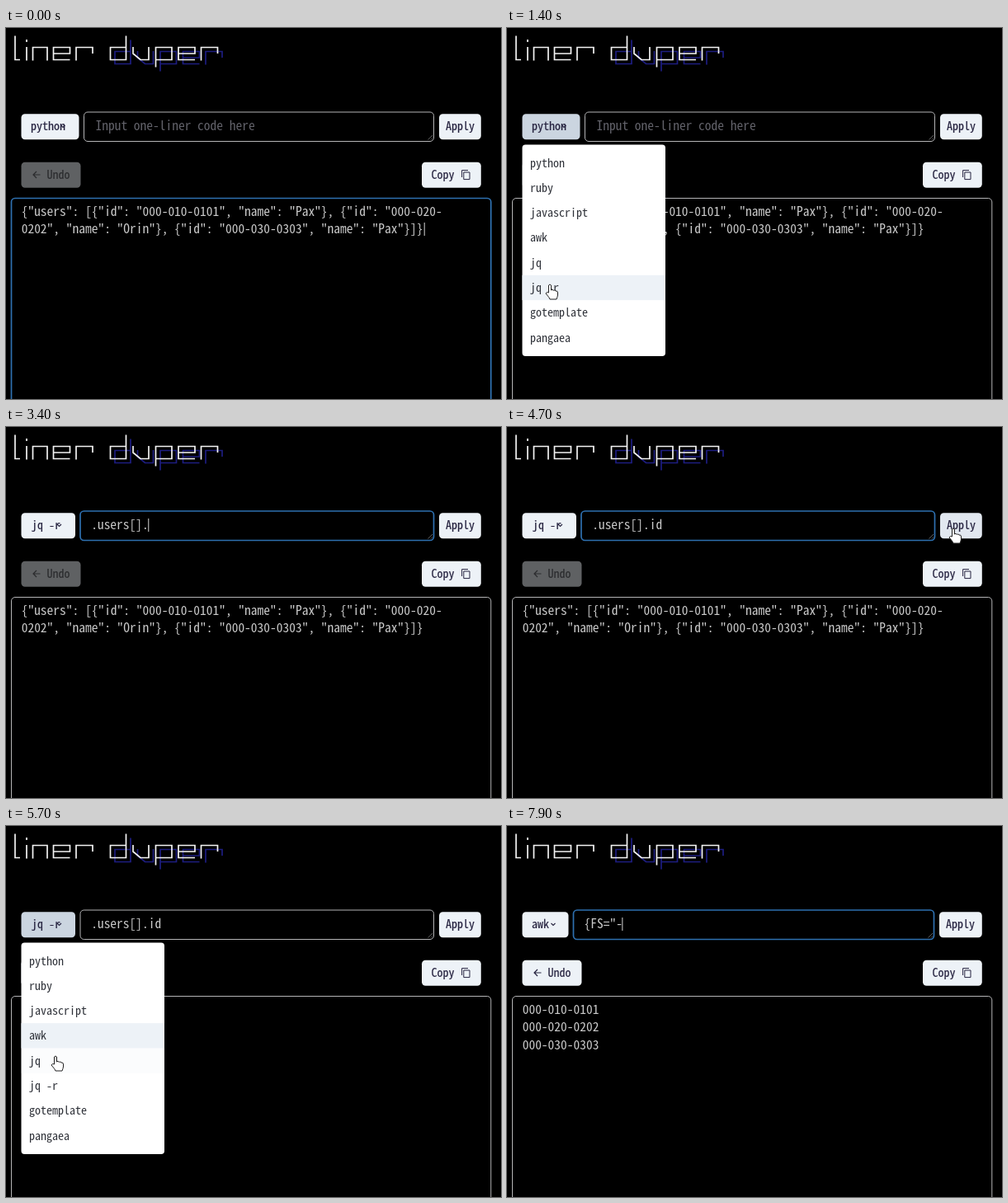
An HTML page that plays this animation: 600 px wide and 450 px high, repeating every 8000 ms.

```html
<!DOCTYPE html>
<html lang="en">
<head>
<meta charset="utf-8">
<title>liner duper</title>
<style>
  html, body { margin: 0; width: 100%; height: 100%; overflow: hidden; background: #000; }
  svg { display: block; width: 600px; height: 450px; }
  text { font-family: "Noto Sans Mono CJK JP", "Noto Sans Mono", "DejaVu Sans Mono", monospace; white-space: pre; }
  .body { fill: #cacaca; }
  .hint { fill: #62626a; }
  .item { fill: #30333a; }
  .label { fill: #25223f; stroke: #25223f; stroke-width: .15; }
  .label.off { fill: #2b2c2e; stroke: #2b2c2e; }
  .line { fill: none; stroke-linejoin: miter; }
</style>
</head>
<body>
<svg viewBox="0 0 600 450">
  <rect width="600" height="450"/>
  <g id="title" class="line" stroke-width="1.7"></g>
  <g id="scene"></g>
</svg>
<script>
const LOOP = 8000, STEP = 100;
const PITCH = 7.73, LABEL_PITCH = 7;
const MENU = { x: 18.5, y: 141.5, w: 173.5, h: 256.5, first: 148.3, row: 30.3 };
const ITEMS = ["python", "ruby", "javascript", "awk", "jq", "jq -r", "gotemplate", "pangaea"];
const IDS = ["000-010-0101", "000-020-0202", "000-030-0303"];
const SOURCE = [
  `{"users": [{"id": "${IDS[0]}", "name": "Pax"}, {"id": "${IDS[1].slice(0, 8)}`,
  `${IDS[1].slice(8)}", "name": "Orin"}, {"id": "${IDS[2]}", "name": "Pax"}]}`
];
const HINT = "Input one-liner code here";
const QUERY = ".users[].id";
const SCRIPT = '{FS="-';

// Layout of the top row for each selected language
const LAYOUTS = {
  "python": { button: 70, text: 30, chevron: 69, input: 94.5, start: 108.5, end: 518.5, apply: 525 },
  "jq -r": { button: 65.5, text: 31, chevron: 64.5, input: 90, start: 103.2, end: 518.5, apply: 525 },
  "awk": { button: 56, text: 30, chevron: 56, input: 80.5, start: 93.5, end: 517.5, apply: 524 }
};

// Times at which each further character appears
const QUERY_KEYS = [2100, 2200, 2300, 2400, 2500, 2700, 2900, 3100, 3400, 4100, 4200];
const SCRIPT_KEYS = [7000, 7200, 7300, 7400, 7700, 7800];

const POINTER = [
  [0, 300, 330], [100, 300, 330], [500, 43, 118], [900, 43, 118],
  [1300, 52, 312], [1500, 52, 312], [1700, 162, 124], [4200, 162, 124],
  [4600, 541, 124], [4900, 541, 124], [5300, 43, 118], [5450, 43, 118],
  [5700, 60, 280], [5800, 60, 280], [5900, 60, 256], [6100, 60, 256],
  [6300, 210, 122], [8000, 210, 122]
];
const HAND = "M-1.5 9V0Q0-2 1.5 0V6Q3 4.5 4.3 6.3Q6 5.3 7 7Q9.5 6.5 9.5 9V12" +
  "Q9 14.5 8 17H0Q-1 14.5-2.5 13L-5 10Q-4 7.5-1.5 9Z";
const ARROW = "M0 0V14L3.5 11L6 16L8 15L5.5 10.2H10Z";

const between = (t, a, b) => t >= a && t < b;
const clamp = v => Math.max(0, Math.min(1, v));
const mix = (a, b, p) => a + (b - a) * p;
const inside = (p, x, y, w, h) => p.x >= x && p.x <= x + w && p.y >= y && p.y <= y + h;

const measure = document.createElement("canvas").getContext("2d");
measure.font = '100px "Noto Sans Mono CJK JP", "Noto Sans Mono", "DejaVu Sans Mono", monospace';
const advance = measure.measureText("0").width / 100;

const text = (x, y, value, kind) => {
  const pitch = /label|item/.test(kind) ? LABEL_PITCH : PITCH;
  return `<text x="${x}" y="${y}" class="${kind}" font-size="${pitch / advance}">${value}</text>`;
};
const box = (x, y, w, h, fill, r = 4.5) =>
  `<rect x="${x}" y="${y}" width="${w}" height="${h}" rx="${r}" fill="${fill}"/>`;
const line = (d, color, width) =>
  `<path class="line" d="${d}" stroke="${color}" stroke-width="${width}"/>`;
const caret = (x, y) => line(`M${x} ${y}v16`, "#d4d4d4", 1);

function field(x, y, w, h, focus) {
  const color = `rgb(${mix(180, 46, focus)},${mix(180, 112, focus)},${mix(182, 176, focus)})`;
  return `<rect x="${x}" y="${y}" width="${w}" height="${h}" rx="4.5"
    stroke="${color}" stroke-width="${mix(1, 1.7, focus)}"/>`;
}

function drawTitle() {
  const e = x => `M${x + 20} 38.5H${x}V23.5H${x + 20}V31H${x}`;
  const r = x => `M${x} 39.5V23.5H${x + 20}V31`;
  const first = `M11 9.5V38.5H17M25 23V39.5M25 14V17M32.5 39.5V23.5H50V39.5${e(57.5)}${r(85)}`;
  const second = "M145.5 9.5V38.5H126.5V23.5H145.5M154 23V31L163 38.5H173V23" +
    `M181.5 47.5V23.5H201V38.5H181.5${e(209)}${r(236.5)}`;
  document.getElementById("title").innerHTML =
    `<path d="${second}" stroke="#1d1d80" transform="translate(5.5 5)"/>` +
    `<path d="${first}${second}" stroke="#f4f4f4"/>`;
}

function pointerAt(t) {
  const i = Math.max(1, POINTER.findIndex(k => k[0] > t));
  const [t0, x0, y0] = POINTER[i - 1], [t1, x1, y1] = POINTER[i];
  const p = clamp((t - t0) / (t1 - t0));
  return { x: mix(x0, x1, p), y: mix(y0, y1, p) };
}

function hoveredItem(t) {
  const p = pointerAt(t);
  return inside(p, MENU.x, MENU.y, MENU.w, MENU.h) ? Math.floor((p.y - MENU.first) / MENU.row) : 0;
}

function typed(t) {
  const count = keys => keys.filter(k => k <= t).length;
  if (t >= 6900) return SCRIPT.slice(0, count(SCRIPT_KEYS));
  if (t > 6400) return QUERY.slice(0, Math.round(11 * clamp((6800 - t) / 400)));
  return QUERY.slice(0, count(QUERY_KEYS));
}

const menuState = t => Math.max(
  clamp((t - 500) / 200) * (t < 1500),
  clamp((t - 5300) / 200) * (t < 6100)
);

function drawMenu(t, shown) {
  if (!shown) return "";
  const scale = mix(.8, 1, shown);
  const rows = ITEMS.map((name, i) => {
    const y = MENU.first + i * MENU.row;
    const tint = hoveredItem(t - 40) === i ? 1 : hoveredItem(t) === i ? .25 : 0;
    return `<g opacity="${tint}">${box(MENU.x, y, MENU.w, MENU.row, "#edf2f7", 0)}</g>` +
      text(28, y + 20.2, name, "item");
  }).join("");
  return `<g opacity="${shown}" transform="translate(${MENU.x} ${MENU.y}) scale(${scale})
    translate(${-MENU.x} ${-MENU.y})">${box(MENU.x, MENU.y, MENU.w, MENU.h, "#fff", 4)}${rows}</g>`;
}

function drawPointer(p, layout, menuOpen) {
  const hand = inside(p, 18, 104, layout.button, 32) || inside(p, layout.apply, 104, 52, 32) ||
    (menuOpen && inside(p, MENU.x, MENU.y, MENU.w, MENU.h));
  const overText = inside(p, layout.input, 102, layout.end - layout.input, 36) || inside(p, 6, 206, 583, 244);
  if (overText && !hand) return "";
  return `<path d="${hand ? HAND : ARROW}" transform="translate(${p.x} ${p.y})" fill="#fff" stroke="#222"/>`;
}

function draw(t) {
  const language = t < 1500 ? "python" : t < 6100 ? "jq -r" : "awk";
  const at = LAYOUTS[language];
  const menu = menuState(t);
  const pointer = pointerAt(t);
  const applied = t >= 4900;
  const value = typed(t);
  const inputFocus = between(t, 1700, 4900) ? 1 : clamp((t - 6340) / 200);
  const outputFocus = t < 500 ? 1 : 0;
  const blinkOff = between(t, 3700, 3900) || between(t, 4600, 4900);
  const overButton = inside(pointer, 18, 104, at.button, 31);
  const overApply = inside(pointer, at.apply, 104, 51, 31);
  const pale = "#edf2f7", hover = "#e2e8f0", pressed = "#cbd5e0", ink = "#25223f";
  const lines = applied ? IDS : SOURCE;

  const parts = [
    box(18.5, 104.3, at.button, 31, menu ? pressed : overButton ? hover : pale),
    text(at.text, 124, language, "label"),
    line(`M${at.chevron - 2.5} 118l2.5 2.5l2.5-2.5`, ink, 1.1),

    field(at.input, 102, at.end - at.input, 35.5, inputFocus),
    line(`M${at.end - 7} 135.5l5.5-5.5M${at.end - 3.5} 135.5l2-2`, "#777", .8),
    value ? text(at.start, 124, value, "body") : text(at.start, 124, HINT, "hint"),
    inputFocus && !blinkOff ? caret(at.start + value.length * PITCH, 111) : "",

    box(at.apply, 104.3, 575.8 - at.apply, 31, overApply ? hover : pale),
    text(at.apply + 8, 124, "Apply", "label"),

    box(18.5, 162.7, 72, 31, applied ? pale : "#5f6163"),
    line("M41.5 178H33M37 174l-4 4l4 4", applied ? ink : "#2b2c2e", 1.2),
    text(49.5, 182.5, "Undo", applied ? "label" : "label off"),

    box(504, 162.7, 71.8, 31, pale),
    text(515.5, 182.5, "Copy", "label"),
    line("M552.6 181V172.6H560M554.8 175h7.2v8.6h-7.2z", ink, 1),

    field(6.5, 206.5, 581.3, 260, outputFocus),
    ...lines.map((s, i) => text(18.7, 228 + i * 21.3, s, "body")),
    outputFocus ? caret(18.7 + SOURCE[1].length * PITCH + 1.5, 236) : "",

    drawMenu(t, menu),
    drawPointer(pointer, at, menu > 0)
  ];
  document.getElementById("scene").innerHTML = parts.join("");
}

let last = -1;
function tick() {
  const t = Math.floor(performance.now() % LOOP / STEP) * STEP;
  if (t !== last) draw(last = t);
  requestAnimationFrame(tick);
}

drawTitle();
tick();
</script>
</body>
</html>
```
